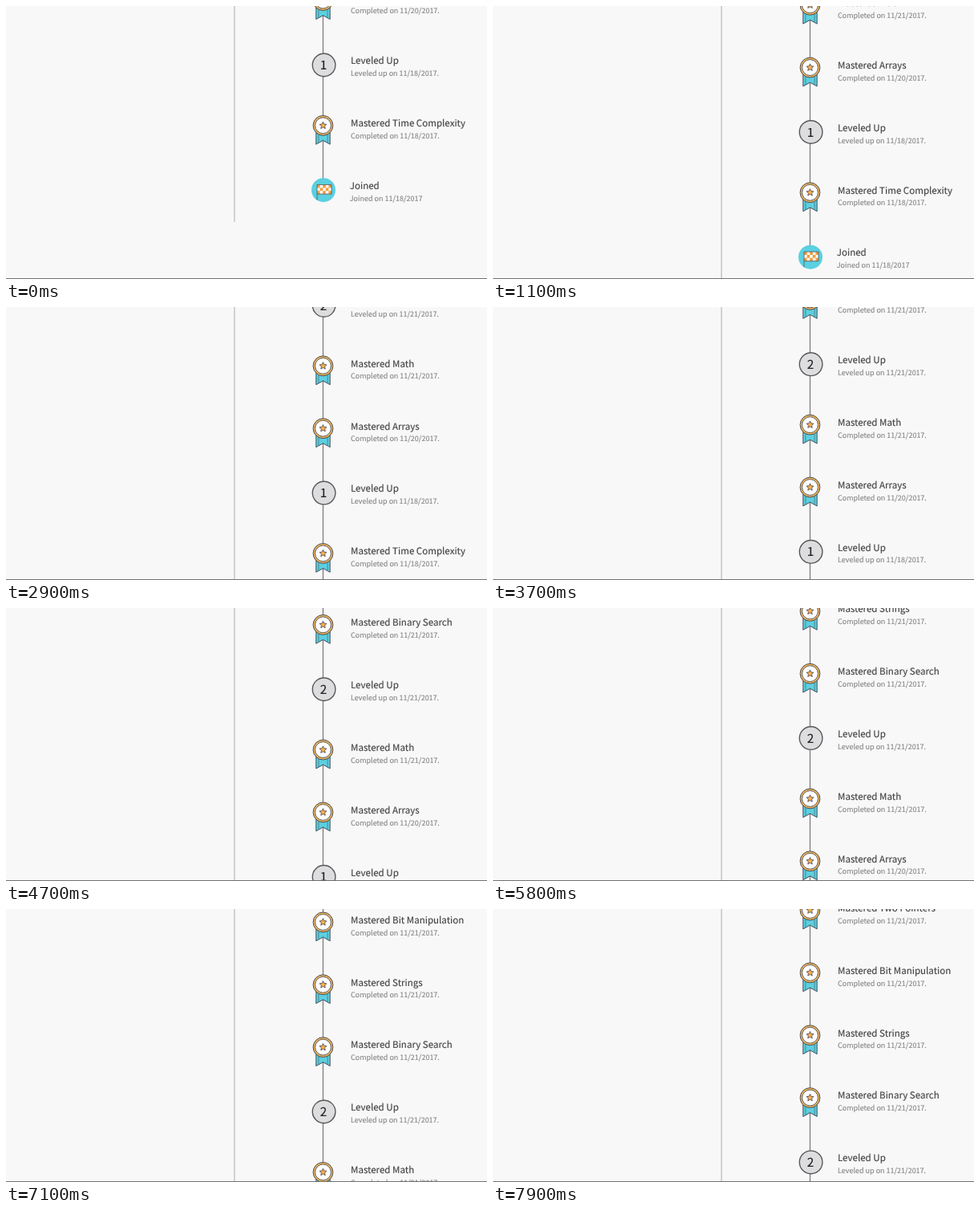
Recreate the animation shown at these times as an HTML page. Size 600 px wide and 340 px high, loop 8 s.

```html
<!DOCTYPE html>
<html lang="en">
<head>
<meta charset="utf-8">
<style>
  html, body { margin: 0; width: 100%; height: 100%; overflow: hidden; background: #f9f8f9; }
  svg { display: block; }
  text { font-family: "Noto Sans CJK SC", "Noto Sans CJK JP", "Noto Sans", sans-serif; text-rendering: geometricPrecision; }
  .title { font-size: 11.55px; fill: #444; stroke: #444; stroke-width: .15px; }
  .note { font-size: 9px; fill: #868686; stroke: #868686; stroke-width: .12px; }
  .digit { font-size: 15.4px; fill: #222; stroke: #222; stroke-width: .15px; text-anchor: middle; }
</style>
</head>
<body>
<svg width="600" height="340" viewBox="0 0 600 340">
  <defs>
    <g id="medal" stroke="#37404c" stroke-width=".9">
      <path d="M-8.7 8V23.4L0 18.6 8.7 23.4V8Z" fill="#5dcfe0"/>
      <path d="M-5.6 11v10M5.6 11v10" stroke-width=".5"/>
      <circle r="12.4" fill="#efb35c"/>
      <circle r="9.9" fill="#fff" stroke-width=".8"/>
      <path id="star" fill="#f7b045" stroke="#46405a" stroke-width=".8" stroke-linejoin="round"/>
    </g>
    <g id="flag">
      <circle r="15" fill="#5bd0e0"/>
      <path fill="#fff" d="M-8-6.6h18V5h-18z"/>
      <path id="checks" fill="#f39c3c"/>
      <path d="M-8 12.5V-6.6h18V5h-18" fill="none" stroke="#4b5560" stroke-width=".8"/>
    </g>
  </defs>
  <g id="page">
    <path d="M285-600V269" stroke="#a9a9ab"/>
    <path d="M395.5-600V229" stroke="#838385" stroke-width="1.4"/>
  </g>
  <path d="M0 339.5H600" stroke="#727274"/>
</svg>
<script>
const $ = id => document.getElementById(id);
const page = $('page');

$('star').setAttribute('d', 'M' + Array.from({ length: 10 }, (_, i) => {
  const r = i % 2 ? 2.2 : 4.7, a = i * Math.PI / 5;
  return [r * Math.sin(a), -r * Math.cos(a)].map(v => v.toFixed(2));
}).join('L') + 'Z');

let checks = '';
for (let row = 0; row < 3; row++)
  for (let col = row % 2; col < 5; col += 2)
    checks += `M${-8 + col * 3.6} ${-6.6 + row * 3.87}h3.6v3.87h-3.6z`;
$('checks').setAttribute('d', checks);

// Oldest entry first, going up the page: [kind or level, day, topic]
const entries = [
  ['joined', 18], ['medal', 18, 'Time Complexity'], [1, 18], ['medal', 20, 'Arrays'],
  ['medal', 21, 'Math'], [2, 21], ['medal', 21, 'Binary Search'], ['medal', 21, 'Strings'],
  ['medal', 21, 'Bit Manipulation'], ['medal', 21, 'Two Pointers']
];

function entryMarkup([kind, day, topic], i) {
  const y = 223.7 - i * 77.85, date = `11/${day}/2017`;
  let x = 430, title, note, badge;
  if (kind === 'joined') {
    x = 428.8;
    title = 'Joined';
    note = `Joined on ${date}`;
    badge = `<use href="#flag" x="396" y="${y + 5.5}"/>`;
  } else if (kind === 'medal') {
    title = `Mastered ${topic}`;
    note = `Completed on ${date}.`;
    badge = `<use href="#medal" x="395.5" y="${y + 3}"/>`;
  } else {
    title = 'Leveled Up';
    note = `Leveled up on ${date}.`;
    badge = `<circle cx="396.6" cy="${y + 5.5}" r="14.3" fill="#dddddf" stroke="#58585a" stroke-width="1.4"/>
      <text class="digit" x="396" y="${y + 11.1}">${kind}</text>`;
  }
  return `${badge}<text class="title" x="${x}" y="${y + 4.3}">${title}</text>
    <text class="note" x="${x}" y="${y + 19.1}">${note}</text>`;
}
page.insertAdjacentHTML('beforeend', entries.map(entryMarkup).join(''));

// Scroll gestures: start ms, duration ms, distance px
const gestures = [
  [300, 1100, 92], [1300, 1500, 59.4], [2800, 1400, 95.4],
  [4500, 1150, 68.2], [5700, 1150, 79.7], [6925, 975, 80.8]
];
const ease = p => 1 - (1 - p ** 1.3) ** 2.2;
const clamp = p => Math.min(1, Math.max(0, p));
const scrollAt = t => gestures.reduce(
  (sum, [start, length, distance]) => sum + distance * ease(clamp((t - start) / length)), 0);

const begin = performance.now();
function draw() {
  const t = Math.floor((performance.now() - begin) % 8000 / 100) * 100;
  page.setAttribute('transform', `translate(0 ${scrollAt(t).toFixed(2)})`);
  requestAnimationFrame(draw);
}
draw();
</script>
</body>
</html>
```
